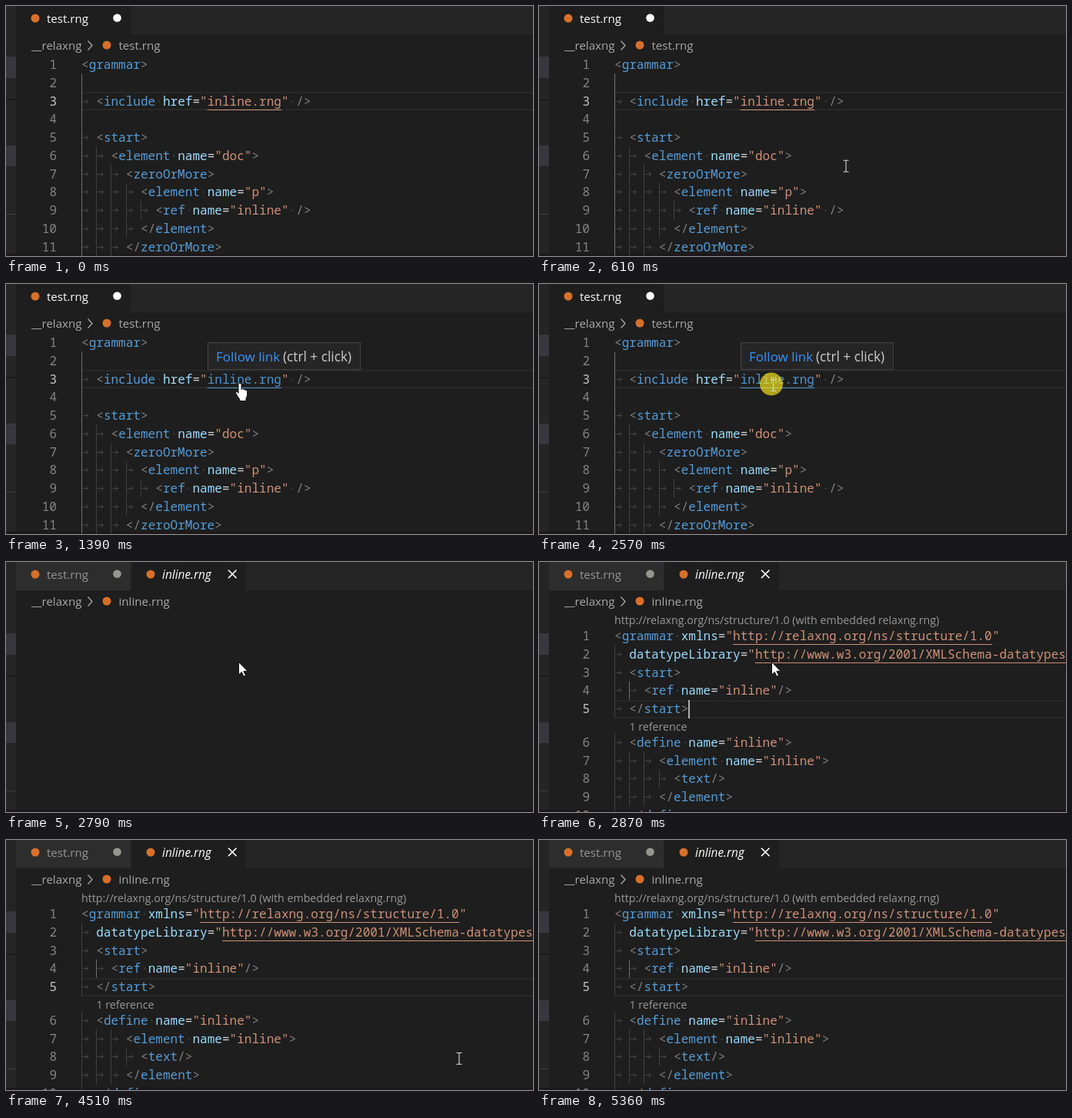
An HTML page for the animation above (5.59 s loop, 685x326 px).

```html
<!DOCTYPE html>
<html lang="en">
<head>
<meta charset="utf-8">
<title>Follow link in editor</title>
<style>
  html, body { margin: 0; width: 100%; height: 100%; overflow: hidden; background: #1e1e1e; }
  svg { display: block; width: 685px; height: 326px; }
  text { white-space: pre; }
  .mono { font: 500 16.05px "Noto Sans Mono", monospace; }
  .ui { font-family: "Open Sans", "Noto Sans", sans-serif; font-size: 15.1px; }
</style>
</head>
<body>
<svg id="stage" viewBox="0 0 685 326" xmlns="http://www.w3.org/2000/svg"></svg>
<script>
const LOOP = 5590, LEFT = 98, CHAR = 9.63, ROW = 23.75;
const COLOR = { punct: '#808080', name: '#569cd6', attr: '#9cdcfe', text: '#ce9178', eq: '#d4d4d4',
  space: '#484848', guide: '#404040', active: '#707070', link: '#4e94ce', crumb: '#a9a9a9', icon: '#d8702a' };
const stage = document.getElementById('stage');

function add(parent, tag, attrs, content) {
  const el = document.createElementNS('http://www.w3.org/2000/svg', tag);
  for (const key in attrs) el.setAttribute(key, attrs[key]);
  if (content !== undefined) el.textContent = content;
  parent.appendChild(el);
  return el;
}
const group = parent => add(parent, 'g', {});
const rect = (parent, x, y, width, height, fill) => add(parent, 'rect', { x, y, width, height, fill });
const line = (parent, d, stroke, width = 1) =>
  add(parent, 'path', { d, stroke, 'stroke-width': width, fill: 'none' });
const label = (parent, x, y, fill, content, style = '') =>
  add(parent, 'text', { x, y, fill, class: 'ui', style }, content);
const mono = (parent, x, y, fill, content, anchor = 'start') =>
  add(parent, 'text', { x, y, fill, class: 'mono', 'text-anchor': anchor }, content);
const dot = (parent, cx, cy, r, fill) => add(parent, 'circle', { cx, cy, r, fill });
const show = (el, on) => el.setAttribute('visibility', on ? 'visible' : 'hidden');

// One line of markup; returns the parts of a link so it can be recoloured.
function markup(parent, col, y, source) {
  const kinds = ['punct', 'text', 'attr', 'eq', 'name', 'space'];
  const link = [];
  for (const m of source.matchAll(/(<\/?|\/?>)|("[^"]*")|(\w+)(?==)|(=)|(\w+)|( )/g)) {
    const kind = kinds[m.slice(1).findIndex(part => part !== undefined)];
    const x = LEFT + (col + m.index) * CHAR;
    const word = m[0];
    if (kind === 'space') {
      dot(parent, x + CHAR / 2, y - 5.5, 1, COLOR.space);
    } else if (/\.rng|http/.test(word)) {
      const inner = word.slice(1, -1), width = inner.length * CHAR;
      mono(parent, x, y, COLOR.text, '"');
      link.push(mono(parent, x + CHAR, y, COLOR.text, inner));
      link.push(rect(parent, x + CHAR, y + 5, width, 1, COLOR.text));
      mono(parent, x + CHAR + width, y, COLOR.text, '"');
    } else {
      mono(parent, x, y, COLOR[kind], word);
    }
  }
  return link;
}

// The active guide is given by its depth and the rows it spans.
function code(parent, rows, current, mid, lit) {
  let link = [];
  rows.forEach(([indent, source], i) => {
    const cy = mid(i), y = Math.round(cy + 5.5), active = i + 1 === current;
    if (active) {
      rect(parent, LEFT, Math.round(cy - 12), 587, 2, '#282828');
      rect(parent, LEFT, Math.round(cy + 10), 587, 2, '#282828');
    }
    mono(parent, 66, y, active ? '#c6c6c6' : '#858585', i + 1, 'end');
    for (let k = 0; k < indent; k++) {
      const x = LEFT + k * 2 * CHAR;
      const bright = k === lit.depth && i >= lit.from && i <= lit.to;
      rect(parent, Math.floor(x + .3), cy - ROW / 2, 1, ROW, bright ? COLOR.active : COLOR.guide);
      if (source) line(parent, `M${x + 1.5} ${y - 5.5}h7.5m-3-3l3 3l-3 3`, COLOR.space);
    }
    const found = markup(parent, indent * 2, y, source);
    if (found.length) link = found;
  });
  return link;
}

function crumbs(parent, file) {
  label(parent, 33, 57, COLOR.crumb, '__relaxng');
  line(parent, 'M106.5 45.5l5.5 6l-5.5 6', COLOR.crumb, 1.3);
  dot(parent, 131, 51, 5.5, COLOR.icon);
  label(parent, 146.5, 57, COLOR.crumb, file);
}

function tab(parent, x, fill, color, file, style) {
  rect(parent, x, 0, 149, 37, fill);
  dot(parent, x + 25, 16, 5.5, COLOR.icon);
  label(parent, x + 40, 22, color, file, style);
}

// Frame
rect(stage, 0, 0, 685, 326, '#1e1e1e');
rect(stage, 0, 0, 685, 37, '#252526');
rect(stage, 0, 0, 13, 326, '#252526');
const side = group(stage);
rect(side, 0, 66, 13, 28, '#37373d');
rect(side, 0, 121, 13, 2, '#1a1a1b');
rect(side, 0, 182, 13, 27, '#37373d');
rect(side, 0, 271, 13, 1, '#3f3f40');
rect(stage, 0, 323, 685, 3, '#1d181c');

// First file
const first = group(stage);
tab(first, 13, '#1e1e1e', '#ffffff', 'test.rng');
dot(first, 144.5, 15.5, 5.3, '#ffffff');
crumbs(first, 'test.rng');
const link = code(first, [
  [0, '<grammar>'], [1, ''], [1, '<include href="inline.rng" />'], [1, ''],
  [1, '<start>'], [2, '<element name="doc">'], [3, '<zeroOrMore>'],
  [4, '<element name="p">'], [5, '<ref name="inline" />'], [4, '</element>'], [3, '</zeroOrMore>']
], 3, i => 76.5 + i * ROW, { depth: 0, from: 1, to: 10 });

const tip = group(first);
add(tip, 'rect', { x: 262.5, y: 76.5, width: 198, height: 35, fill: '#252526', stroke: '#454545' });
label(tip, 273, 101, '#3794ff', 'Follow link', 'font-size:17px');
label(tip, 360, 101, '#cccccc', '(ctrl + click)', 'font-size:17.3px');

// Second file
const second = group(stage);
tab(second, 13, '#2d2d2d', '#969696', 'test.rng');
dot(second, 144.5, 15.5, 5.3, '#969690');
tab(second, 163, '#1e1e1e', '#ffffff', 'inline.rng', 'font-style:italic;font-weight:500;font-size:15.4px');
line(second, 'M289 10.5l10.5 10.5m0-10.5l-10.5 10.5', '#ffffff', 1.7);
crumbs(second, 'inline.rng');

const body = group(second);
const lens = 'font-size:14.2px';
label(body, 98, 81, '#999999', 'http://relaxng.org/ns/structure/1.0 (with embedded relaxng.rng)', lens);
label(body, 117.5, 220, '#999999', '1 reference', lens);
code(body, [
  [0, '<grammar xmlns="http://relaxng.org/ns/structure/1.0"'],
  [1, 'datatypeLibrary="http://www.w3.org/2001/XMLSchema-datatypes">'],
  [1, '<start>'], [2, '<ref name="inline"/>'], [1, '</start>'],
  [1, '<define name="inline">'], [3, '<element name="inline">'], [4, '<text/>'],
  [3, '</element>'], [1, '</define>']
], 5, i => 96.5 + i * ROW + (i > 4 ? 20 : 0), { depth: 1, from: 3, to: 3 });
const caret = rect(body, 194, 180, 2, 24, '#aeafad');

// Pointers
const click = dot(stage, 302, 130.5, 15, '#ffec1c');
click.setAttribute('fill-opacity', .66);
const beam = group(stage);
line(beam, 'M-3.5-7.5h2.5l1 1l1-1h2.5M0-6.5v13M-3.5 7.5h2.5l1-1l1 1h2.5', '#d8d8d8', 1.1);
const hand = add(stage, 'path', {
  d: 'M302 131.5c0-2.6 4-2.6 4 0v6c.4-1.5 3-1.2 3 .4c.6-1 2.6-.5 2.6 1c.8-.7 2 0 2 1.2v4.4c0 2-1.6 3.5-1.6 5.5v2.5h-8.2v-2c-1.6-2.5-3.8-5-5-8c-.7-2 1.5-2.6 2.4-1.2l.8 1.2z',
  fill: '#ffffff', stroke: '#111111', 'stroke-width': 1
});
const arrow = add(stage, 'path', {
  d: 'M302.5 130.5v16.5l3.8-3.6l2.6 5.8l2.6-1.1l-2.6-5.7h5.1z',
  fill: '#ffffff', stroke: '#111111', 'stroke-width': 1
});

// Moves of the text pointer: start, time per step, steps, from, to
const moves = [
  [70, 75, 3, [513, 304], [416.5, 223]],
  [460, 77, 8, [416.5, 223], [304.5, 132]],
  [3730, 70, 2, [304.5, 131], [468, 245]],
  [4120, 75, 3, [468, 245], [573, 274]],
  [4510, 70, 1, [573, 274], [589, 285]],
  [4580, 80, 1, [589, 285], [613, 313]]
];

function beamAt(t) {
  let at = moves[0][3];
  for (const [start, gap, steps, from, to] of moves) {
    if (t < start) break;
    const p = Math.min(1, (1 + Math.floor((t - start) / gap)) / steps);
    const k = steps > 3 ? p * p * (3 - 2 * p) : p;
    at = from.map((v, i) => v + (to[i] - v) * k);
  }
  return at;
}

function draw(t) {
  const within = (a, b) => t >= a && t < b;
  const opened = t >= 2720;
  show(first, !opened);
  show(second, opened);
  side.setAttribute('transform', `translate(0 ${opened ? 27 : 0})`);
  link.forEach(el => el.setAttribute('fill', t >= 1000 ? COLOR.link : COLOR.text));
  show(tip, within(1310, 2720));
  tip.setAttribute('opacity', t < 1390 ? .5 : 1);
  show(body, t >= 2870);
  show(caret, within(2870, 3340) || within(3800, 4350) || within(4810, 5360));
  show(click, within(2570, 2720));
  show(hand, within(1080, 2570));
  show(arrow, within(2720, 2950));
  show(beam, within(70, 1080) || within(2570, 2720) || within(2950, 4660));
  beam.setAttribute('transform', `translate(${beamAt(t).join(' ')})`);
}

const began = performance.now();
function tick() {
  draw((performance.now() - began) % LOOP);
  requestAnimationFrame(tick);
}
draw(0);
requestAnimationFrame(tick);
</script>
</body>
</html>
```
